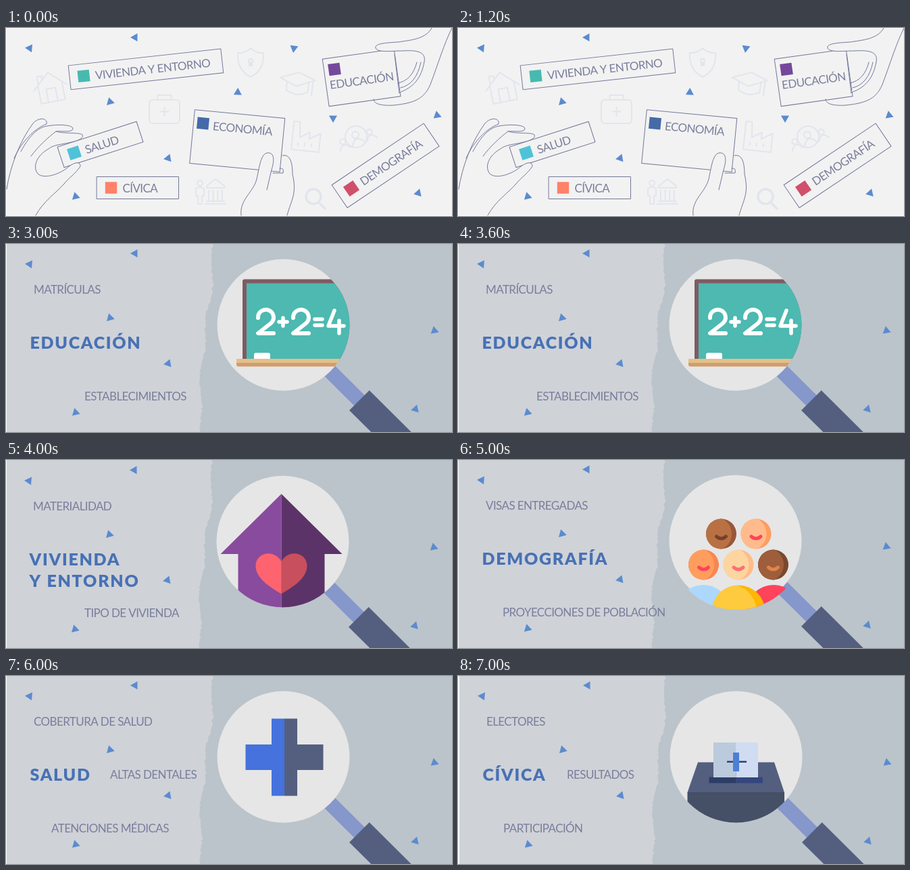
Write an HTML page with a canvas that moves like this. It is 660 px wide and 280 px high and loops after 8 s.

```html
<!DOCTYPE html>
<html lang="es">
<head>
<meta charset="utf-8">
<title>Indicadores</title>
<style>
html, body { margin: 0; width: 100%; height: 100%; overflow: hidden; background: #fff; }
canvas { display: block; }
</style>
</head>
<body>
<canvas id="stage" width="660" height="280"></canvas>
<script>
const ctx = document.getElementById('stage').getContext('2d');
const PAPER = '#f2f2f2', INK = '#74789b', SLATE = '#545f80', FAINT = '#e2e5ed';
const lens = { x: 410.5, y: 120.5, r: 98 };

function rect(color, x, y, w, h, r = 0) {
  ctx.fillStyle = color;
  ctx.beginPath();
  ctx.roundRect(x, y, w, h, r);
  ctx.fill();
}
function disc(color, x, y, r) {
  ctx.fillStyle = color;
  ctx.beginPath();
  ctx.arc(x, y, r, 0, 7);
  ctx.fill();
}
function fill(color, d) {
  ctx.fillStyle = color;
  ctx.fill(new Path2D(d));
}
function line(d, color = INK, width = 1) {
  ctx.strokeStyle = color;
  ctx.lineWidth = width;
  ctx.lineCap = ctx.lineJoin = 'round';
  ctx.stroke(new Path2D(d));
}
function outlined(d) {
  fill(PAPER, d);
  line(d);
}
function at(x, y, degrees, draw) {
  ctx.save();
  ctx.translate(x, y);
  ctx.rotate(degrees * Math.PI / 180);
  draw();
  ctx.restore();
}
function inCircle(x, y, r, draw) {
  ctx.save();
  ctx.beginPath();
  ctx.arc(x, y, r, 0, 7);
  ctx.clip();
  draw();
  ctx.restore();
}
const inLens = draw => () => inCircle(lens.x, lens.y, lens.r, draw);

function text(string, x, y, font, spacing, color) {
  ctx.font = font + ' Lato, sans-serif';
  ctx.letterSpacing = spacing + 'px';
  ctx.fillStyle = color;
  ctx.fillText(string, x, y);
}
const label = (string, x, y) => text(string, x, y, '400 17px', -0.6, '#7a7e9c');
const heading = (string, x, y) => text(string, x, y, '900 25px', 1.7, '#4871b5');

function triangle(x, y, degrees) {
  at(x, y, degrees, () => fill('#5b8bcf', 'M7 0L-3.5 6-3.5-6Z'));
}
function sharedTriangles() {
  triangle(35, 30, 185);
  triangle(191, 14, 180);
  triangle(154, 110, 15);
  triangle(103, 251, -103);
}

// Cards are laid out around the centre of their swatch.
function card({ x, y, angle, color, name, w, h, left = -21, top = -h / 2, textX = 17, textY = 7 }) {
  at(x, y, angle, () => {
    outlined(`M${left} ${top}h${w}v${h}h${-w}Z`);
    rect(color, -8.7, -8.7, 17.4, 17.4);
    label(name, textX, textY);
  });
}

const circle = (x, y, r) => `M${x - r} ${y}a${r} ${r} 0 1 0 ${2 * r} 0a${r} ${r} 0 1 0 ${-2 * r} 0`;

function icons() {
  const draw = d => line(d, FAINT, 2);
  const person = (x, y, s) => draw(circle(x, y, s) + `M${x - 2 * s} ${y + 3 * s}q${2 * s} ${-3.5 * s} ${4 * s} 0`);
  at(66, 89, -11, () => draw('M-25 0L0-23 25 0M-18-6V21H18V-6M-7 21V1H7V21M-17-9V-20H-10V-15'));
  at(234.5, 121, 0, () => {
    ctx.strokeStyle = FAINT;
    ctx.lineWidth = 2;
    ctx.beginPath();
    ctx.roundRect(-22.5, -14, 45, 35, 5);
    ctx.stroke();
    draw('M-10-14V-21H10V-14M0-3V10M-6 3.5H6');
  });
  at(362, 51, 0, () => {
    draw('M0-21Q8-13 19-14C20 3 14 15 0 22C-14 15-20 3-19-14Q-8-13 0-21' + circle(0, -2, 3));
    rect(FAINT, -3, 0, 6, 6);
  });
  at(432, 82, 7, () => draw('M-27-5L0-16 25-7-2 5ZM-16 0V12Q0 22 16 12V-2M22-6V16'));
  at(445, 163, 6, () => {
    draw('M-21 20V-22H-12L-10 1 4-8V2L20-8V20Z');
    for (let x = -12; x <= 8; x += 10) draw(`M${x} 9v4`);
  });
  at(518, 162, -20, () => {
    draw(circle(0, 0, 16));
    person(0, -3, 5);
    person(-21, 0, 4);
    person(21, 0, 4);
  });
  draw(circle(287, 231, 4) + 'M281 239Q287 235 293 239V250H290V262H284V250H281ZM297 235L310 225 323 235V238H297ZM297 258H323M295 262H325');
  for (let i = 0; i < 4; i++) draw(`M${300 + 6.6 * i} 242v15`);
  line(circle(455, 251, 11) + 'M463 260L472 269', FAINT, 3.5);
}

function hands() {
  line('M1 240C6 207 20 169 40 142C49 132 62 134 60 143C42 150 23 169 12 194');
  line('M22 184C33 163 46 148 61 146C77 143 99 144 99 150C98 156 85 153 74 154C62 163 46 178 37 191');
  outlined('M74 154C87 158 108 155 113 159C116 166 101 169 88 172C77 174 69 175 63 180C45 190 39 207 47 217C57 226 80 217 91 208C99 201 110 197 110 206C103 217 93 223 86 232C74 246 56 257 44 279');

  outlined('M348 279C345 256 366 245 371 225C375 207 377 187 387 186C398 185 397 199 393 211L386 241');
  outlined('M409 190C421 187 424 202 424 218C431 247 422 256 416 279');
  line('M405 209Q412 208 410 216H395');

  outlined('M630 0C621 17 598 18 580 21C562 22 545 23 547 30C551 37 569 34 588 34C605 33 622 34 619 50C615 74 603 89 582 96');
  line('M575 40L582 97M580 82Q601 78 608 51M584 89Q607 84 614 51');
  line('M544 106C544 114 558 116 574 115C600 112 618 108 628 84C640 52 648 24 660 0');
}

function intro() {
  rect(PAPER, 1, 1, 659, 278);
  icons();
  sharedTriangles();
  triangle(426, 30, 98);
  triangle(343, 96, -88);
  triangle(484, 134, 210);
  triangle(638, 130, 20);
  triangle(610, 246, -73);
  triangle(240, 194, 170);
  card({ x: 115, y: 71.5, angle: -6.3, w: 227, h: 36, color: '#47bab0', name: 'VIVIENDA Y ENTORNO' });
  card({ x: 101, y: 186, angle: -18, w: 123, h: 32, color: '#50c2d8', name: 'SALUD' });
  card({ x: 155.5, y: 238, angle: 0, w: 121, h: 33, color: '#ff8168', name: 'CÍVICA' });
  card({ x: 511, y: 239, angle: -34, w: 164, h: 41, color: '#d0506c', name: 'DEMOGRAFÍA' });
  card({ x: 291.5, y: 142, angle: 5.5, w: 134, h: 80, left: -14, top: -19, textX: 15, textY: 8.5, color: '#456aa8', name: 'ECONOMÍA' });
  card({ x: 486, y: 61.5, angle: -8, w: 107, h: 71, left: -15.5, top: -17.5, textX: -10, textY: 28.5, color: '#75489c', name: 'EDUCACIÓN' });
  hands();
}

function tornPaper() {
  let seed = 7, d = 'M0-2H308';
  for (let y = 0; y <= 282; y += 3) {
    seed = seed * 16807 % 2147483647;
    const jitter = seed / 2147483647 * 3 - 1.5;
    const x = 297 + 9.5 * Math.cos(y / 75) + 2.5 * Math.cos((y - 66) / 14) + jitter;
    d += `L${x} ${y}`;
  }
  return d + 'H0Z';
}
const paperShape = tornPaper();

function topic({ title, top, side, bottom, picture, shift = [0, 0] }) {
  rect('#bbc4cb', 1, 0, 659, 280);
  ctx.save();
  ctx.translate(...shift);
  fill('#cfd2d7', paperShape);
  sharedTriangles();
  triangle(240, 178, 170);
  triangle(634, 129, 20);
  triangle(606, 246, -73);
  title.forEach((row, i) => heading(row, 35.5, 155.5 + 32 * i));
  label(top, 41, 73.5);
  if (side) label(...side, 153);
  label(...bottom, 232.5);
  at(479, 189, 45, () => {
    rect('#8597cb', 0, -11, 70, 22);
    rect(SLATE, 62, -21, 130, 42);
  });
  disc('#e6e6e6', lens.x, lens.y, lens.r);
  picture();
  ctx.restore();
  rect('#fff', 0, 0, 1 + Math.max(0, shift[0]), 280);
}

const chart = inLens(() => {
  const bars = { '#bf3a2b': 89.5, '#f0c419': 151.5, '#e67e25': 125.5, '#894b9d': 100 };
  Object.entries(bars).forEach(([color, y], i) => rect(color, 338 + 41.2 * i, y, 21, 140));
});

const blackboard = inLens(() => {
  rect('#7f5b63', 350, 52.5, 170, 122, 3);
  rect('#4db9b0', 356, 58.5, 170, 113);
  rect('#fff', 367, 162, 24, 14, 3);
  rect('#d09d6e', 341, 171, 180, 11.5, 3);
  rect('#e5bf8a', 341, 171, 180, 6);
  for (const x of [373, 425]) line(`M${x} 110a11.5 11.5 0 1 1 19 8L${x} 133h23`, '#fff', 6);
  line('M404 116h12m-6-6v12M457 112h11m-11 9h11M486 99L477 122h23m-7-8v19', '#fff', 5.5);
});

const house = inLens(() => {
  const half = (side, wall, heart) => at(lens.x - 2, 49.5, 0, () => {
    ctx.scale(side, 1);
    fill(wall, 'M0 0L90 89.5H64V180H0Z');
    fill(heart, 'M0 149C-14 140-38 127-38 107C-38 87-10 81 0 101Z');
  });
  half(-1, '#894b9d', 'transparent');
  half(1, '#5c3368', '#fe646f');
  half(-1, 'transparent', '#c84f5d');
});

function face(x, y, skin, shade, mouth) {
  inCircle(x, y, 22.5, () => {
    rect(shade, x - 23, y - 23, 46, 46);
    disc(skin, x - 10, y, 25.5);
  });
  line(`M${x - 7} ${y + 4}q7 6 14 0`, mouth, 5);
}
function people() {
  face(389.5, 110, '#b97143', '#98573a', '#75412b');
  face(441, 110, '#ffbb8b', '#ff9d5f', '#ff435b');
  face(363.5, 156, '#ff9d5f', '#f98650', '#ff435b');
  face(415, 156, '#fdd5a0', '#ffbc88', '#ff6f72');
  face(466.5, 156, '#9e5e3c', '#7b482d', '#e08449');
  inCircle(412, 123, 100, () => {
    disc('#add8fd', 363, 226, 40);
    disc('#ff435b', 467, 226, 40);
    disc('#fdb700', 415, 226, 39.5);
    inCircle(415, 226, 39.5, () => disc('#fecb3e', 401, 226, 41));
  });
}

function healthCross() {
  at(412, 121, 0, () => {
    for (const [side, color] of [[-1, '#4572dc'], [1, SLATE]]) {
      ctx.scale(side, 1);
      fill(color, 'M0-57.5H19V-19H57.5V19H19V57.5H0Z');
      ctx.scale(side, 1);
    }
  });
}

const ballotBox = inLens(() => {
  at(lens.x, 128.5, 0, () => {
    fill(SLATE, 'M-56.5 0H56.5L71.5 45H-72Z');
    rect('#454f66', -72, 44.5, 143.5, 60);
    rect('#2c3d66', -40, 22, 40, 9);
    rect('#35477c', 0, 22, 39.5, 9);
    rect('#bccadd', -33.5, -29.5, 33.5, 52);
    rect('#d0dcf1', 0, -29.5, 32.5, 52);
    rect('#2f4276', -13.5, -2, 29, 2.5);
    rect('#4d80d4', -4.5, -14.5, 9, 28);
  });
});

const topics = [
  { title: ['ECONOMÍA'], top: 'IMPORTACIONES', bottom: ['EXPORTACIONES', 116], picture: chart },
  { title: ['EDUCACIÓN'], top: 'MATRÍCULAS', bottom: ['ESTABLECIMIENTOS', 116], picture: blackboard },
  { title: ['VIVIENDA', 'Y ENTORNO'], top: 'MATERIALIDAD', bottom: ['TIPO DE VIVIENDA', 117], picture: house, shift: [-1, 1] },
  { title: ['DEMOGRAFÍA'], top: 'VISAS ENTREGADAS', bottom: ['PROYECCIONES DE POBLACIÓN', 66], picture: people },
  { title: ['SALUD'], top: 'COBERTURA DE SALUD', side: ['ALTAS DENTALES', 154], bottom: ['ATENCIONES MÉDICAS', 67], picture: healthCross },
  { title: ['CÍVICA'], top: 'ELECTORES', side: ['RESULTADOS', 160], bottom: ['PARTICIPACIÓN', 66], picture: ballotBox, shift: [1, 0] }
];

// The opening scene lasts two seconds, each topic one.
function render() {
  const second = Math.floor(performance.now() % 8000 / 1000);
  rect('#fff', 0, 0, 660, 280);
  if (second < 2) intro();
  else topic(topics[second - 2]);
  requestAnimationFrame(render);
}
render();
</script>
</body>
</html>
```
